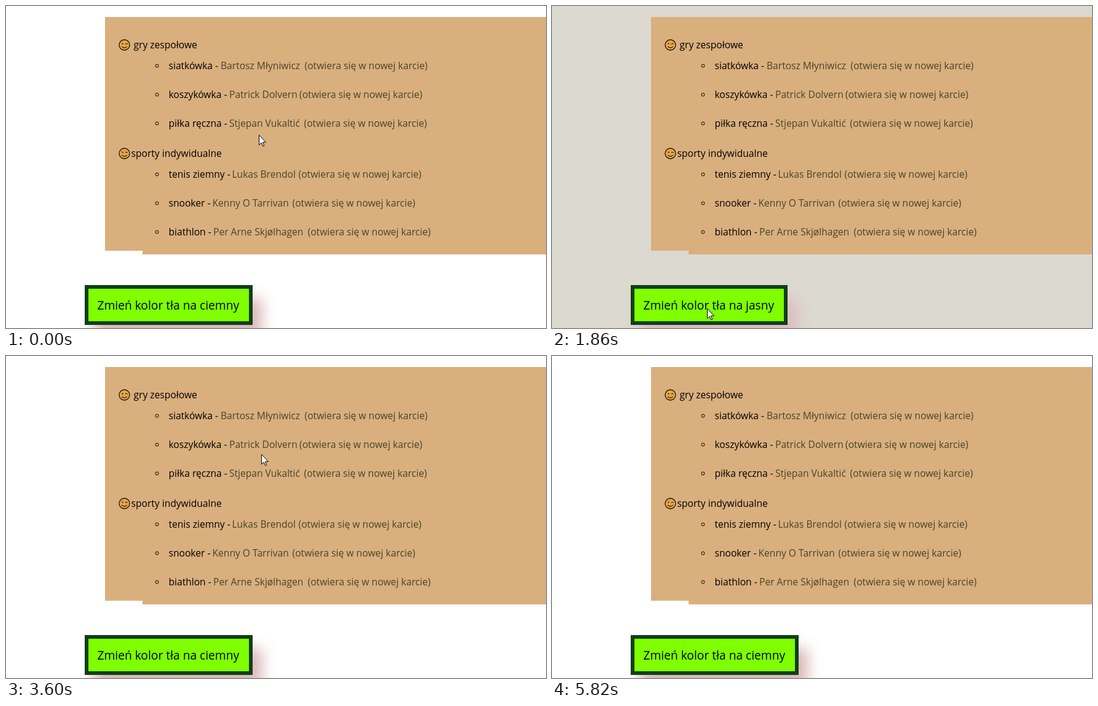
Recreate the animation shown at these times as an HTML page. Size 878x525 px, loop 6.29 s.

```html
<!DOCTYPE html>
<html lang="pl">
<head>
<meta charset="utf-8">
<title>Sporty</title>
<style>
  html, body { margin: 0; width: 100%; height: 100%; overflow: hidden; background: #fff; }
  #stage { position: absolute; left: 0; top: 0; width: 878px; height: 525px; overflow: hidden; background: #fff; }
  #stage.dark { background: #dcd9d0; }
  svg { position: absolute; left: 0; top: 0; }
  text, #button { font-family: "Open Sans", "Noto Sans", sans-serif; }
  .list text { font-size: 15.6px; white-space: pre; }
  .list .link { fill: #484429; }
  .list .note { font-size: 15.7px; }
  #button {
    position: absolute; left: 128px; top: 455px; width: 273px; height: 65px;
    box-sizing: border-box; border: 6px solid #113f14; padding-left: 14.5px;
    background: #7fff00; color: #000; font-size: 19.2px; line-height: 53px; white-space: nowrap;
    box-shadow: 15px 22px 22px rgba(165, 75, 80, .4);
  }
  .dark #button { width: 255px; box-shadow: 15px 24px 24px rgba(225, 150, 175, .45); }
  #tip text { font-size: 11.4px; fill: #555; }
</style>
</head>
<body>
<div id="stage">
  <svg class="list" width="878" height="525">
    <defs>
      <g id="smiley" fill="none" stroke="#1c1408" stroke-linecap="round">
        <circle r="8.5" fill="#e3a648" stroke-width="1.3"/>
        <circle cx="-3" cy="-2" r="1.1" fill="#1c1408" stroke="none"/>
        <path d="M1.8-1.6Q3.4-2.8 4.8-1.6M-4 2.8Q0 6.4 4 2.8" stroke-width="1.1"/>
      </g>
    </defs>
    <path d="M161 18H878V405H222V399H161Z" fill="#d9af7e"/>
    <use href="#smiley" x="192.5" y="63.5"/>
    <use href="#smiley" x="192.5" y="240.5"/>
    <text x="207.5" y="69">gry zespołowe</text>
    <text x="203.5" y="246">sporty indywidualne</text>
    <g id="rows"></g>
  </svg>

  <div id="button"></div>

  <svg width="878" height="525">
    <path id="bar" d="M-1 526V518.5H194Q198.5 518.5 198.5 523V526Z" fill="#dee1e6" stroke="#c8cacd"/>
    <g id="tip">
      <rect x="428.5" y="149.5" width="195" height="56" fill="#fff" stroke="#454545"/>
      <text x="436" y="166">Artykuł o</text>
      <text x="567" y="182">Patricku</text>
      <text x="567" y="198">Dolvernie</text>
    </g>
    <g id="cursor" fill="#fff" stroke="#000" stroke-linejoin="round">
      <circle id="click" r="12" fill="#ff0" fill-opacity=".5" stroke="none"/>
      <path id="arrow" d="M.5.5V16.5L4.1 13 6.6 18.7 8.8 17.8 6.3 12.2H11.5Z"/>
      <g id="hand" transform="translate(-7 0)">
        <path d="M5.5 14.5V2Q5.5.5 7 .5T8.5 2V8Q11.2 7.2 11.5 8.7 13.9 8.1 14.3 9.5 16.5 9.2 16.5 11.2V15.2Q16.5 18.2 14.8 20.2V22.5H6.2V20.5Q4.2 18 2.2 14 .2 11 1.5 10 3.2 9.2 5.5 12Z"/>
        <path d="M8.5 8V12M11.5 9V12M14.3 10V12.5" fill="none"/>
      </g>
    </g>
  </svg>
</div>

<script>
  const LOOP = 6290;
  const $ = id => document.getElementById(id);

  // baseline, label, link x, name, x of the note
  const rows = [
    [103, "siatkówka", 349, "Bartosz Młyniwicz", 485.5],
    [150, "koszykówka", 363, "Patrick Dolvern", 477],
    [197, "piłka ręczna", 363, "Stjepan Vukaltić", 484.5],
    [280, "tenis ziemny", 367.5, "Lukas Brendol", 475.5],
    [327, "snooker", 335.5, "Kenny O Tarrivan", 465.5],
    [374, "biathlon", 337, "Per Arne Skjølhagen", 490.5]
  ];
  $("rows").innerHTML = rows.map(([y, label, x, name, noteX]) => `
    <circle cx="245.5" cy="${y - 5.5}" r="2.5" fill="none" stroke="#000"/>
    <text x="264.5" y="${y}">${label} -</text>
    <text class="link" x="${x}" y="${y}">${name}</text>
    <text class="link note" x="${noteX}" y="${y}">(otwiera się w nowej karcie)</text>`).join("");

  // first step, last step, number of steps, end point
  const moves = [
    [470, 1030, 8, 240, 474],
    [1100, 1300, 3, 252, 492],
    [1640, 1640, 1, 252, 493],
    [2030, 2030, 1, 253, 492],
    [2900, 3460, 9, 406, 199],
    [3530, 3600, 2, 415, 160],
    [3660, 3730, 2, 420, 135],
    [4270, 4480, 4, 420, 139],
    [5210, 5820, 10, 774, 527]
  ];
  const smooth = p => p * p * (3 - 2 * p);
  const within = (t, a, b) => t >= a && t < b;

  function cursorAt(t) {
    let x = 411, y = 210;
    for (const [start, end, steps, toX, toY] of moves) {
      if (t < start) break;
      const gap = (end - start) / (steps - 1 || 1) || 1;
      const done = Math.min(steps, Math.floor((t - start) / gap + 1e-6) + 1);
      const p = smooth(done / steps);
      x += (toX - x) * p;
      y += (toY - y) * p;
      if (done < steps) break;
    }
    return [Math.round(x), Math.round(y)];
  }

  const show = (id, on) => { $(id).style.display = on ? "" : "none"; };

  function draw(now) {
    const t = now % LOOP;
    const dark = within(t, 1860, 2640);
    $("stage").className = dark ? "dark" : "";
    const label = "Zmień kolor tła na " + (dark ? "jasny" : "ciemny");
    if ($("button").textContent !== label) $("button").textContent = label;

    const [x, y] = cursorAt(t);
    const overLink = y < 156;
    $("cursor").setAttribute("transform", `translate(${x} ${y})`);
    show("arrow", !overLink);
    show("hand", overLink);
    show("click", within(t, 1570, 1640) || within(t, 2430, 2500));

    show("tip", within(t, 4070, 5280));
    $("tip").setAttribute("transform", `translate(0 ${Math.max(0, y - 136)})`);
    show("bar", within(t, 3800, 5700));
    $("bar").style.opacity = Math.min(1, (t - 3730) / 140, (5700 - t) / 350);
  }

  const begin = performance.now();
  function tick() {
    draw(performance.now() - begin);
    requestAnimationFrame(tick);
  }
  tick();
</script>
</body>
</html>
```
